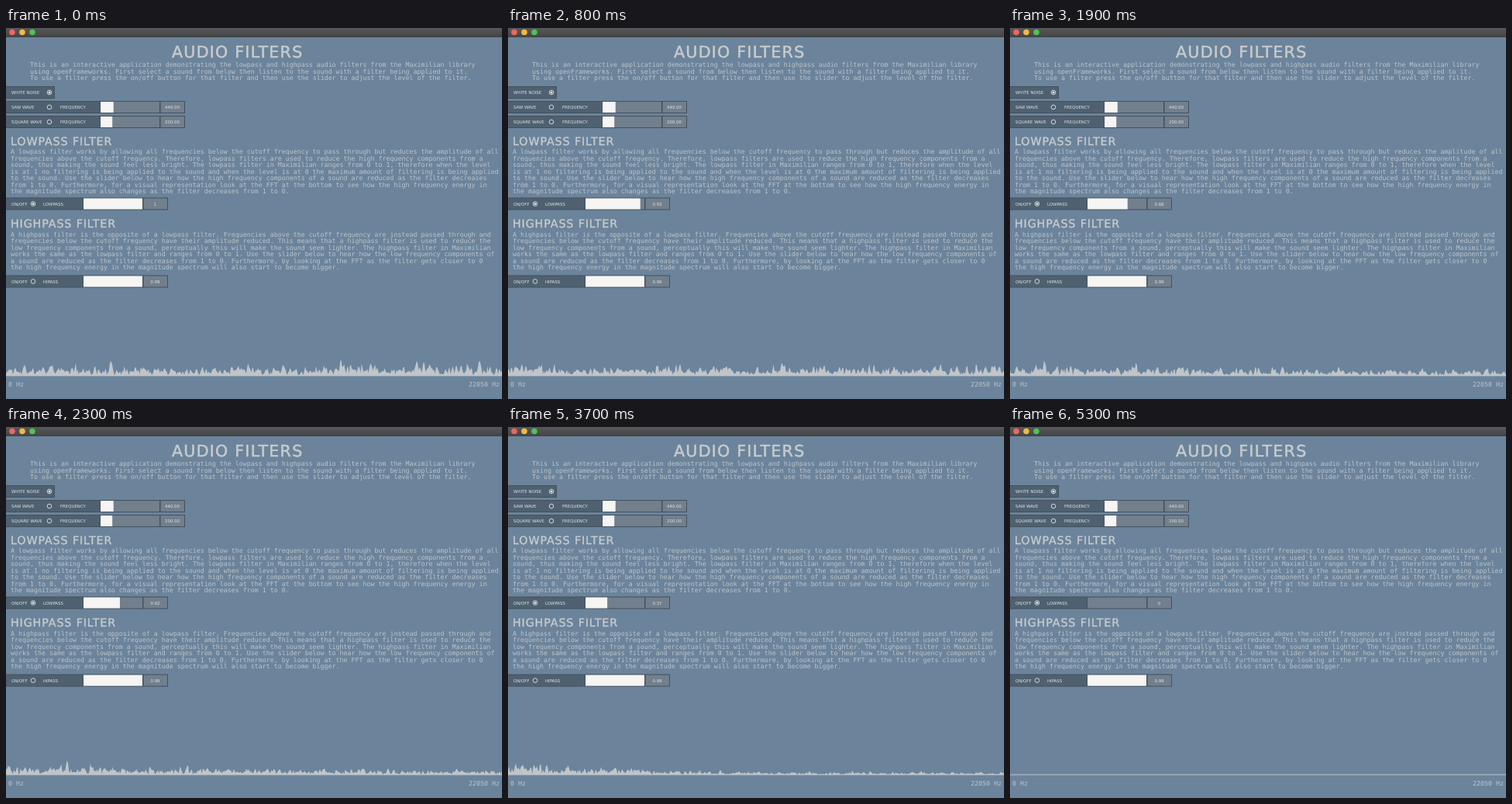
Write an HTML page with a canvas that moves like this. It is 640 px wide and 478 px high and loops after 5600 ms.

```html
<!DOCTYPE html>
<html lang="en">
<head>
<meta charset="utf-8">
<title>Audio filters</title>
<style>
  html, body { margin: 0; width: 100%; height: 100%; overflow: hidden; background: #6b849b; }
  canvas { display: block; }
</style>
</head>
<body>
<canvas id="stage" width="640" height="478"></canvas>
<script>
const ctx = document.getElementById('stage').getContext('2d');
const LOOP = 5600, STEP = 100, LAST_STEP = 53;
const SANS = '"DejaVu Sans", sans-serif';
const MONO = '8.3px "DejaVu Sans Mono", monospace';
const COLORS = {
  page: '#6b849b', barTop: '#58595a', barBottom: '#414345', panel: '#4f6170',
  edge: '#43505c', track: '#727f8c', white: '#f6f5f4', label: '#dfe3e6',
  text: '#bcc4cb', heading: '#c8cbcd', spectrum: '#c0c5ca'
};

// Cutoff level over time: [ms, level]
const LEVELS = [[0, 1], [800, .93], [1900, .68], [2800, .54], [3700, .37], [4500, .11], [5300, 0]];

const INTRO = [
  'This is an interactive application demonstrating the lowpass and highpass audio filters from the Maximilian library',
  'using openFrameworks. First select a sound from below then listen to the sound with a filter being applied to it.',
  'To use a filter press the on/off button for that filter and then use the slider to adjust the level of the filter.'
];
const LOWPASS = [
  'A lowpass filter works by allowing all frequencies below the cutoff frequency to pass through but reduces the amplitude of all',
  'frequencies above the cutoff frequency. Therefore, lowpass filters are used to reduce the high frequency components from a',
  'sound, thus making the sound feel less bright. The lowpass filter in Maximilian ranges from 0 to 1, therefore when the level',
  'is at 1 no filtering is being applied to the sound and when the level is at 0 the maximum amount of filtering is being applied',
  'to the sound. Use the slider below to hear how the high frequency components of a sound are reduced as the filter decreases',
  'from 1 to 0. Furthermore, for a visual representation look at the FFT at the bottom to see how the high frequency energy in',
  'the magnitude spectrum also changes as the filter decreases from 1 to 0.'
];
const HIGHPASS = [
  'A highpass filter is the opposite of a lowpass filter. Frequencies above the cutoff frequency are instead passed through and',
  'frequencies below the cutoff frequency have their amplitude reduced. This means that a highpass filter is used to reduce the',
  'low frequency components from a sound, perceptually this will make the sound seem lighter. The highpass filter in Maximilian',
  'works the same as the lowpass filter and ranges from 0 to 1. Use the slider below to hear how the low frequency components of',
  'a sound are reduced as the filter decreases from 1 to 0. Furthermore, by looking at the FFT as the filter gets closer to 0',
  'the high frequency energy in the magnitude spectrum will also start to become bigger.'
];

function rect(x, y, w, h, color) {
  ctx.fillStyle = color;
  ctx.fillRect(x, y, w, h);
}

function text(str, x, y, font, color, align = 'left') {
  ctx.font = font;
  ctx.fillStyle = color;
  ctx.textAlign = align;
  ctx.fillText(str, x, y);
}

// Medium weight, loosely tracked
function heading(str, x, y, size) {
  ctx.letterSpacing = size * .06 + 'px';
  text(str, x, y, size + 'px ' + SANS, COLORS.heading);
  ctx.strokeStyle = COLORS.heading;
  ctx.lineWidth = size * .025;
  ctx.strokeText(str, x, y);
  ctx.letterSpacing = '0px';
}

function disc(x, y, r, color) {
  ctx.fillStyle = color;
  ctx.beginPath();
  ctx.arc(x, y, r, 0, Math.PI * 2);
  ctx.fill();
}

const paragraph = (lines, x, y) =>
  lines.forEach((line, i) => text(line, x, y + i * 8.5, MONO, COLORS.text));

const label = (str, x, y, align) =>
  text(str, x, y + 2, '5.4px ' + SANS, COLORS.label, align);

function titleBar() {
  const shade = ctx.createLinearGradient(0, 0, 0, 12);
  shade.addColorStop(0, COLORS.barTop);
  shade.addColorStop(1, COLORS.barBottom);
  rect(0, 0, 640, 12, shade);
  ['#f0655c', '#f0b93f', '#4fc257'].forEach((c, i) => disc(8 + 13 * i, 5.5, 3.8, c));
}

function toggle(name, x, y, width, on) {
  rect(0, y - 8, width, 16, COLORS.edge);
  rect(0, y - 7, width - 1, 14, COLORS.panel);
  label(name, 7, y);
  ctx.strokeStyle = COLORS.label;
  ctx.lineWidth = .9;
  ctx.beginPath();
  ctx.arc(x, y, 2.8, 0, Math.PI * 2);
  ctx.stroke();
  if (on) disc(x, y, 1.5, COLORS.label);
}

function slider(name, nameX, y, x, fill, value) {
  rect(nameX - 8, y - 8, x + 117 - nameX, 16, COLORS.edge);
  rect(nameX - 8, y - 7, x + 7 - nameX, 14, COLORS.panel);
  rect(x, y - 7, 76, 14, COLORS.track);
  rect(x + 77.5, y - 7, 30.5, 14, COLORS.track);
  rect(x, y - 7, 76 * fill, 14, COLORS.white);
  label(name, nameX, y);
  label(value, x + 92.5, y, 'center');
}

function random(seed) {
  return () => {
    seed = seed + 0x6D2B79F5 | 0;
    let t = Math.imul(seed ^ seed >>> 15, seed | 1);
    t ^= t + Math.imul(t ^ t >>> 7, t | 61);
    return ((t ^ t >>> 14) >>> 0) / 4294967296;
  };
}

// Hann-windowed white noise through a one-pole lowpass
function drawSpectrum(step, level) {
  const bins = 512, base = 448, rnd = random(step * 977 + 11);
  const noise = Array.from({ length: bins + 3 }, () => {
    const r = Math.sqrt(-2 * Math.log(1 - rnd())), a = rnd() * Math.PI * 2;
    return [r * Math.cos(a), r * Math.sin(a)];
  });
  const part = (i, k) => noise[i + 1][k] - (noise[i][k] + noise[i + 2][k]) / 2;
  const pole = 1 - level;
  ctx.fillStyle = COLORS.spectrum;
  ctx.beginPath();
  ctx.moveTo(0, base);
  for (let i = 0; i <= bins; i++) {
    const w = Math.PI * i / bins;
    const gain = level && level / Math.sqrt(1 - 2 * pole * Math.cos(w) + pole * pole);
    const magnitude = Math.hypot(part(i, 0), part(i, 1));
    ctx.lineTo(i * 640 / bins, base - Math.min(20, magnitude * 4.6 * gain));
  }
  ctx.lineTo(640, base);
  ctx.fill();
  rect(0, 447.5, 640, 1, COLORS.spectrum);
}

function levelAt(ms) {
  const i = Math.max(1, LEVELS.findIndex(([t]) => t >= ms));
  const [t0, a] = LEVELS[i - 1], [t1, b] = LEVELS[i];
  return a + (b - a) * (ms - t0) / (t1 - t0);
}

function draw(step) {
  const level = levelAt(step * STEP);
  const shown = level === 0 || level === 1 ? String(level) : level.toFixed(2);

  rect(0, 0, 640, 478, COLORS.page);
  titleBar();

  heading('AUDIO FILTERS', 214, 38, 20.6);
  paragraph(INTRO, 31, 50);

  toggle('WHITE NOISE', 56, 83, 63, true);
  toggle('SAW WAVE', 56, 102, 63, false);
  slider('FREQUENCY', 70, 102, 122, .22, '440.00');
  toggle('SQUARE WAVE', 56, 121, 63, false);
  slider('FREQUENCY', 70, 121, 122, .2, '200.00');

  heading('LOWPASS FILTER', 6, 150.5, 14.3);
  paragraph(LOWPASS, 6, 162);
  toggle('ON/OFF', 35, 226.5, 41, true);
  slider('LOWPASS', 48, 226.5, 100, level, shown);

  heading('HIGHPASS FILTER', 6, 256.5, 14.3);
  paragraph(HIGHPASS, 6, 268.5);
  toggle('ON/OFF', 35, 326.5, 41, false);
  slider('HIPASS', 48, 326.5, 100, 1, '0.99');

  drawSpectrum(step, level);
  text('0 Hz', 3, 462, MONO, COLORS.text);
  text('22050 Hz', 597, 462, MONO, COLORS.text);
}

ctx.textRendering = 'geometricPrecision';
const start = performance.now();
let current = -1;

function tick() {
  const ms = (performance.now() - start) % LOOP;
  const step = Math.min(LAST_STEP, Math.floor(ms / STEP));
  if (step !== current) draw(current = step);
  requestAnimationFrame(tick);
}
tick();
</script>
</body>
</html>
```
